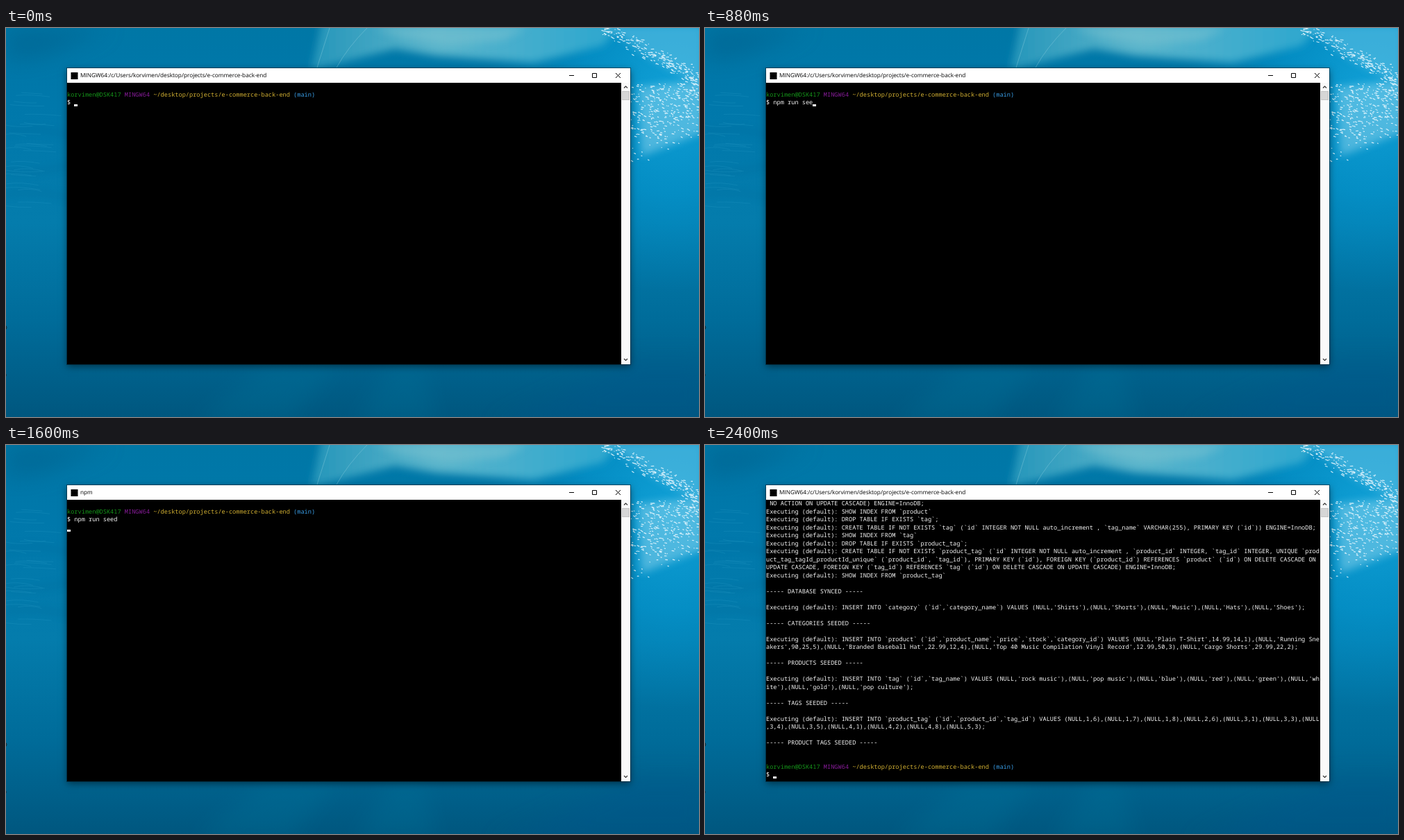
These frames come from a looping animation (998x561 px, 2.44 s). An HTML page:

```html
<!DOCTYPE html>
<html lang="en">
<head>
<meta charset="utf-8">
<title>Seeding a database</title>
<style>
  html, body { margin: 0; width: 100%; height: 100%; overflow: hidden; background: #00719f; }
  #stage { position: relative; width: 998px; height: 561px; overflow: hidden; }
  #sea { position: absolute; inset: 0; }
  #win {
    position: absolute; left: 88px; top: 58px; width: 811px; height: 427px;
    background: #000;
    box-shadow: 0 0 0 1px rgba(0, 30, 45, .55), 0 3px 10px rgba(0, 0, 0, .5);
  }
  #bar { position: absolute; left: 0; top: 0; width: 100%; height: 21px; background: #fff; }
  #title {
    position: absolute; left: 19px; top: 0; white-space: pre;
    font: 8.24px/21px "Open Sans", "Noto Sans", sans-serif; color: #000;
    text-rendering: geometricPrecision;
  }
  #chrome { position: absolute; left: 0; top: 0; }
  #term {
    position: absolute; left: 0; top: 21.4px; margin: 0; width: 798px; height: 405px;
    overflow: hidden; color: #f4f4f4; white-space: pre;
    font: 500 8.63px/11.5px "Noto Sans Mono", "DejaVu Sans Mono", monospace;
    text-rendering: geometricPrecision; font-variant-ligatures: none;
  }
  #cursor { position: absolute; width: 5px; height: 3px; background: #fff; }
  .user { color: #15961a; }
  .sys { color: #881c9a; }
  .dir { color: #d2b032; }
  .git { color: #3aa0ea; }
</style>
</head>
<body>
<div id="stage">
  <svg id="sea" width="998" height="561" viewBox="0 0 998 561">
    <defs>
      <linearGradient id="deep" x2="0" y2="1">
        <stop offset="0" stop-color="#0077a6"/>
        <stop offset=".2" stop-color="#0078ab"/>
        <stop offset=".5" stop-color="#047cac"/>
        <stop offset=".75" stop-color="#006c9a"/>
        <stop offset="1" stop-color="#00577f"/>
      </linearGradient>
      <radialGradient id="glow">
        <stop offset="0" stop-color="#12a2d8"/>
        <stop offset=".5" stop-color="#0594cc" stop-opacity=".75"/>
        <stop offset="1" stop-color="#0088c0" stop-opacity="0"/>
      </radialGradient>
      <linearGradient id="sheet">
        <stop offset="0" stop-color="#2596ba"/>
        <stop offset=".4" stop-color="#5ab4cb"/>
        <stop offset="1" stop-color="#2aa6cf"/>
      </linearGradient>
      <filter id="soft" x="-30%" y="-60%" width="160%" height="220%"><feGaussianBlur stdDeviation="6"/></filter>
      <filter id="haze" x="-50%" y="-50%" width="200%" height="200%"><feGaussianBlur stdDeviation="16"/></filter>
    </defs>
    <rect width="998" height="561" fill="url(#deep)"/>
    <ellipse cx="960" cy="100" rx="270" ry="280" fill="url(#glow)"/>
    <path d="M0 0H150L60 40L0 50Z" fill="#005f8b" opacity=".5" filter="url(#haze)"/>
    <path d="M455 -10H890L860 25L760 50L620 40L560 30L440 60Z" fill="url(#sheet)" filter="url(#soft)"/>
    <path d="M530 0H750L715 18L640 26L570 14Z" fill="#7cc3d0" opacity=".5" filter="url(#soft)"/>
    <path d="M466 0L448 57M520 0Q492 28 476 57" stroke="#8fd0df" fill="none" opacity=".4"/>
    <path d="M860 -5L1005 -5V85L930 45Z" fill="#5cc0e4" opacity=".6" filter="url(#soft)"/>
    <path d="M910 85L1005 75V150L915 185Z" fill="#8fd6ee" opacity=".5" filter="url(#soft)"/>
    <g fill="none" stroke="#005f90" stroke-width="4" opacity=".4" filter="url(#soft)">
      <path d="M0 150Q45 140 90 156M0 205Q40 212 90 198M0 240Q50 232 90 246"/>
    </g>
    <path id="ripples" fill="none" stroke="#2a9cc6" opacity=".28"/>
    <path d="M380 480L480 480L410 570L270 570ZM560 480L600 480L620 570L500 570Z" fill="#00789f" opacity=".25" filter="url(#haze)"/>
    <path d="M900 480H1010V575H700Z" fill="#00578c" opacity=".4" filter="url(#haze)"/>
    <path id="spray" fill="none" stroke="#eefaff" stroke-width="1.2" stroke-linecap="round" opacity=".85"/>
    <path d="M0 429.5q2 2.5 0 5M0 499v3" fill="none" stroke="#16242c"/>
  </svg>

  <div id="win">
    <div id="bar"></div>
    <div id="title"></div>
    <pre id="term"></pre>
    <div id="cursor"></div>
    <svg id="chrome" width="811" height="427" viewBox="88 58 811 427">
      <rect x="93.5" y="64" width="10" height="10" fill="#000"/>
      <g fill="none" stroke="#000">
        <path d="M811 68.5h7M844.5 65.5h6v6h-6zM878 65l7 7M885 65l-7 7"/>
      </g>
      <rect x="886" y="79" width="13" height="406" fill="#fafafa"/>
      <rect x="887.5" y="91.5" width="10" height="12" fill="#d6d6d6" stroke="#c4c4c4"/>
      <path d="M890 86.5l2.5-2.5l2.5 2.5M890 477l2.5 2.5l2.5-2.5" fill="none" stroke="#333" stroke-width="1.2"/>
    </svg>
  </div>
</div>

<script>
const LOOP = 2440, TICK = 40;
const COLS = 154, ROWS = 35, COL_W = 5.178, ROW_H = 11.5, TOP = 21.4;
const TYPE_START = 300, TYPE_STEP = 51, ENTER = 1120;
const NPM = 1280, SCRIPT = 1640, LOG = 1920, LOG_TIME = 160, DONE = 2280;

const $ = id => document.getElementById(id);
const title = $('title'), term = $('term'), cursor = $('cursor');

const path = 'desktop/projects/e-commerce-back-end';
const shellTitle = 'MINGW64:/c/Users/korvimen/' + path;
const prompt = '<span class="user">korvimen@DSK417</span> <span class="sys">MINGW64</span> ' +
  `<span class="dir">~/${path}</span> <span class="git">(main)</span>`;
const command = 'npm run seed';

const exec = sql => 'Executing (default): ' + sql;
const drop = name => exec(`DROP TABLE IF EXISTS \`${name}\`;`);
const index = name => exec(`SHOW INDEX FROM \`${name}\``);
const create = (name, cols) =>
  exec(`CREATE TABLE IF NOT EXISTS \`${name}\` (\`id\` INTEGER NOT NULL auto_increment , ${cols}) ENGINE=InnoDB;`);
const insert = (name, cols, rows) =>
  exec(`INSERT INTO \`${name}\` (${['id', ...cols].map(c => `\`${c}\``)}) VALUES ${rows.map(r => `(NULL,${r})`)};`);
const note = text => ['', `----- ${text} -----`, ''];
const quote = text => text.split('|').map(s => `'${s}'`);
const key = 'PRIMARY KEY (`id`)';
const ref = (col, name, rule) =>
  `FOREIGN KEY (\`${col}\`) REFERENCES \`${name}\` (\`id\`) ON DELETE ${rule} ON UPDATE CASCADE`;

const log = [
  drop('category'),
  create('category', '`category_name` VARCHAR(255) NOT NULL, ' + key),
  index('category'),
  drop('product'),
  create('product', '`product_name` VARCHAR(255) NOT NULL, `price` DECIMAL NOT NULL, ' +
    '`stock` INTEGER NOT NULL DEFAULT 10, `category_id` INTEGER, ' + key + ', ' +
    ref('category_id', 'category', 'NO ACTION')),
  index('product'),
  drop('tag'),
  create('tag', '`tag_name` VARCHAR(255), ' + key),
  index('tag'),
  drop('product_tag'),
  create('product_tag', '`product_id` INTEGER, `tag_id` INTEGER, ' +
    'UNIQUE `product_tag_tagId_productId_unique` (`product_id`, `tag_id`), ' + key + ', ' +
    ref('product_id', 'product', 'CASCADE') + ', ' + ref('tag_id', 'tag', 'CASCADE')),
  index('product_tag'),
  ...note('DATABASE SYNCED'),
  insert('category', ['category_name'], quote('Shirts|Shorts|Music|Hats|Shoes')),
  ...note('CATEGORIES SEEDED'),
  insert('product', ['product_name', 'price', 'stock', 'category_id'], [
    "'Plain T-Shirt',14.99,14,1", "'Running Sneakers',90,25,5", "'Branded Baseball Hat',22.99,12,4",
    "'Top 40 Music Compilation Vinyl Record',12.99,50,3", "'Cargo Shorts',29.99,22,2"]),
  ...note('PRODUCTS SEEDED'),
  insert('tag', ['tag_name'], quote('rock music|pop music|blue|red|green|white|gold|pop culture')),
  ...note('TAGS SEEDED'),
  insert('product_tag', ['product_id', 'tag_id'],
    '1,6 1,7 1,8 2,6 3,1 3,3 3,4 3,5 4,1 4,2 4,8 5,3'.split(' ')),
  ...note('PRODUCT TAGS SEEDED')
].flatMap(line => line.match(new RegExp(`.{1,${COLS}}`, 'g')) || ['']);

function screen(t) {
  const typed = Math.max(0, Math.min(command.length, Math.floor((t - TYPE_START) / TYPE_STEP)));
  const rows = ['', prompt, '$ ' + command.slice(0, typed)];
  if (t >= ENTER) rows.push('');
  if (t >= SCRIPT) rows.push('> e-commerce-back-end@1.0.0 seed', '> node seeds/index.js', '', '');
  if (t >= LOG) {
    const part = Math.min(1, (t - LOG + TICK) / LOG_TIME);
    rows.splice(-1, 0, ...log.slice(0, Math.ceil(log.length * part)));
  }
  if (t >= DONE) rows.push(prompt, '$ ');
  return rows.slice(-ROWS);
}

function caption(t) {
  if (t < NPM || t >= DONE) return shellTitle;
  return t < SCRIPT ? 'npm' : command;
}

let last = -1;
function draw() {
  const t = Math.floor(performance.now() % LOOP / TICK) * TICK;
  if (t !== last) {
    last = t;
    const rows = screen(t), y = rows.length - 1;
    title.textContent = caption(t);
    term.innerHTML = rows.join('\n');
    cursor.style.left = Math.round(rows[y].length * COL_W) + 'px';
    cursor.style.top = Math.round(TOP + y * ROW_H + 8) + 'px';
  }
  requestAnimationFrame(draw);
}

// Seeded flecks of foam and faint ripples for the wallpaper.
let seed = 7;
const rand = () => (seed = seed * 16807 % 2147483647) / 2147483647;
const fleck = (x, y, len) => `M${x.toFixed(1)} ${y.toFixed(1)}l${len.toFixed(1)} ${(len * (rand() - .1) * .8).toFixed(1)}`;
let foam = '', ripples = '';
for (let i = 0; i < 220; i++) {
  const u = rand();
  foam += fleck(858 + 140 * u, 72 * u + (rand() + rand() - 1) * 16, rand() * 4);
}
for (let i = 0; i < 330; i++) {
  const u = rand();
  foam += fleck(900 + 98 * u, 80 + 115 * rand() * rand() ** .4 * (1.1 - u * .4), rand() * 3);
}
for (let i = 0; i < 26; i++) {
  const y = 90 + 170 * rand();
  ripples += `M${(rand() * 40 - 10).toFixed(1)} ${y.toFixed(1)}q20 ${(rand() * 10 - 5).toFixed(1)} ${(30 + rand() * 25).toFixed(1)} 2`;
}
$('spray').setAttribute('d', foam);
$('ripples').setAttribute('d', ripples);

draw();
</script>
</body>
</html>
```
